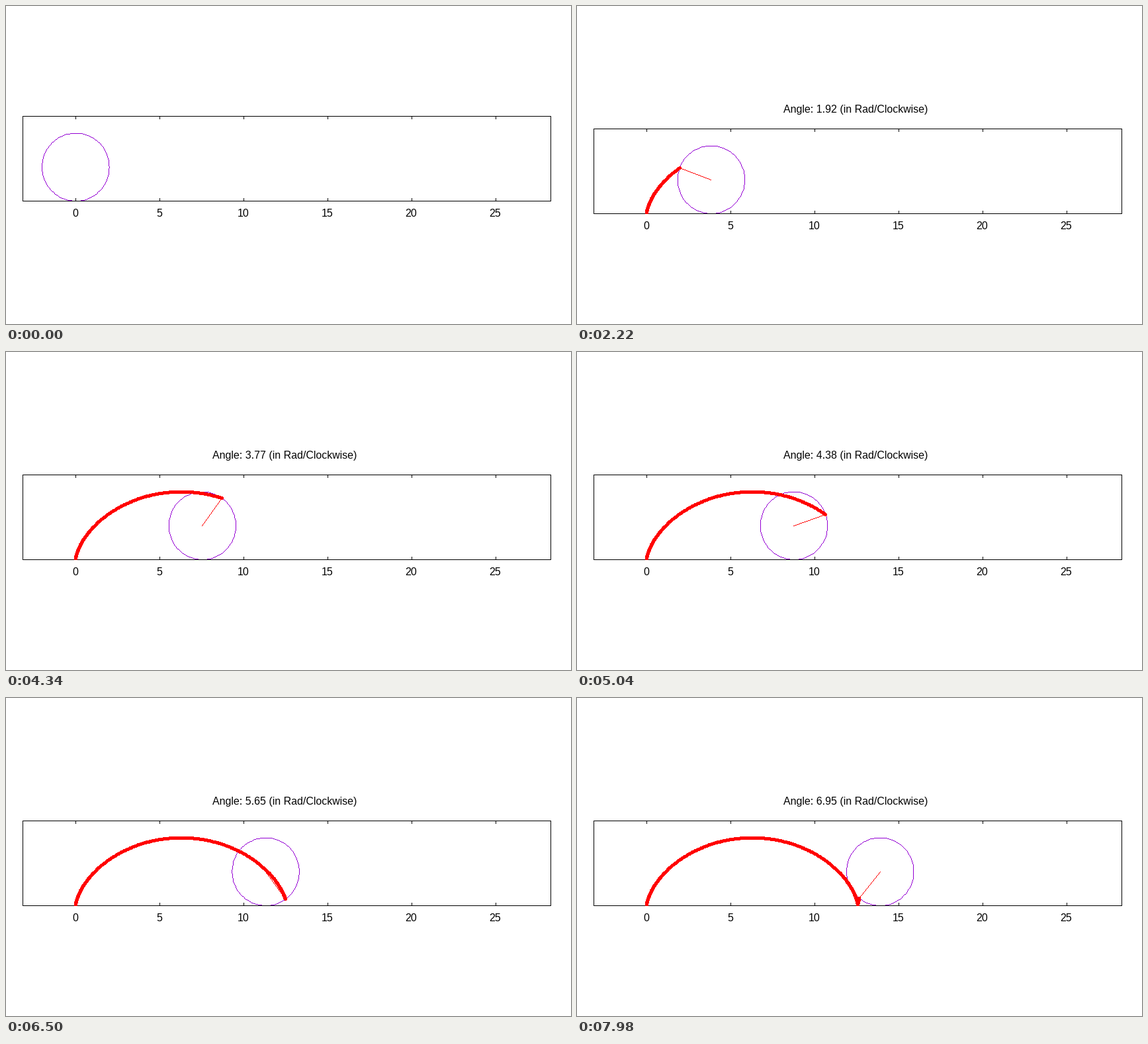
A matplotlib script that plays this animation: 854 px wide and 480 px high, repeating every 8 s.

```python
import numpy as np
import matplotlib.pyplot as plt
from matplotlib.animation import FuncAnimation
from matplotlib.patches import PathPatch, Rectangle
from matplotlib.path import Path

W, H, DPI = 854, 480, 64
PX = 72 / DPI                       # one pixel in points
FRAMES, STEP_MS = 400, 20

LEFT, RIGHT, TOP, BOTTOM = 25, 823, 185, 313
SX = (RIGHT - LEFT) / (10 * np.pi)  # x runs from -pi to 9 pi
SY = (BOTTOM - TOP) / 5             # y runs from 0 to 5
R = 2
TITLE_SHIFT = 19                    # the plot sits higher without a title

plt.rcParams["font.family"] = "Liberation Sans"
plt.rcParams["text.hinting"] = "default"

# Pen outlines, relative to the top left corner of their pixel
DOT = np.array([(0, 0), (1, 0), (1, 1), (0, 1)])
DISC = np.array([(-1, -2), (2, -2), (2, -1), (3, -1), (3, 2), (2, 2),
                 (2, 3), (-1, 3), (-1, 2), (-2, 2), (-2, -1), (-1, -1)])


def to_px(x, y):
    """Plot units to whole pixels, as an array of (column, row)."""
    col = LEFT + (np.asarray(x) + np.pi) * SX
    row = BOTTOM - np.asarray(y) * SY
    return np.round(np.column_stack([col, row]))


def raster(points):
    """Pixels along a polyline, one per step of the longer axis."""
    points = np.asarray(points)
    runs = [points[:1]]
    for a, b in zip(points[:-1], points[1:]):
        steps = int(np.abs(b - a).max())
        if steps:
            part = np.arange(1, steps + 1)[:, None] / steps
            runs.append(np.floor(a + (b - a) * part + 0.5))
    return np.concatenate(runs)


def stamp(pen, pixels):
    """One path holding the pen outline at each pixel."""
    corners = np.vstack([pen, pen[:1]])
    verts = (pixels[:, None, :] + corners[None]).reshape(-1, 2)
    codes = [Path.MOVETO] + [Path.LINETO] * (len(pen) - 1) + [Path.CLOSEPOLY]
    return Path(verts, np.tile(codes, len(pixels)))


def cycloid(a):
    return R * (a - np.sin(a)), R * (1 - np.cos(a))


fig = plt.figure(figsize=(W / DPI, H / DPI), dpi=DPI, facecolor="white")
ax = fig.add_axes([0, 0, 1, 1])
ax.axis("off")
ax.set_xlim(0, W)
ax.set_ylim(H, 0)


def ink(color, z, path=Path(np.empty((0, 2)))):
    patch = PathPatch(path, facecolor=color, lw=0, edgecolor="none",
                      antialiased=False, snap=False, zorder=z)
    return ax.add_artist(patch)


def stroke(points, color, z):
    return ink(color, z, stamp(DOT, raster(points)))


def label(x, y, text):
    return ax.text(x, y, text, size=16 * PX, ha="center", va="baseline",
                   color="black")


# Frame and ticks
stroke([(LEFT, TOP), (RIGHT, TOP), (RIGHT, BOTTOM), (LEFT, BOTTOM),
        (LEFT, TOP)], "black", 2)
for value in range(0, 26, 5):
    col = to_px(value, 0)[0, 0]
    stroke([(col, TOP), (col, TOP + 4)], "black", 2)
    stroke([(col, BOTTOM), (col, BOTTOM - 4)], "black", 2)
    label(col - 0.5, 337, str(value))

title = label(421.5, 161, "")
wheel = ink("#9400d3", 1)
spoke = ink("red", 3)
trace = ink("red", 4)
trace.set_clip_path(Rectangle((LEFT, TOP), RIGHT + 1 - LEFT,
                              BOTTOM + 1 - TOP, transform=ax.transData))

turn = np.linspace(0, 2 * np.pi, 100)


def draw(n):
    started = n > 0
    shift = 0 if started else TITLE_SHIFT
    ax.set_ylim(H + shift, shift)

    a = np.radians(max(n - 1, 0))
    rim = to_px(R * a + R * np.cos(turn), R + R * np.sin(turn))
    wheel.set_path(stamp(DOT, raster(rim)))

    for part in (title, spoke, trace):
        part.set_visible(started)
    if started:
        px, py = cycloid(a)
        spoke.set_path(stamp(DOT, raster(to_px([R * a, px], [R, py]))))
        trail = to_px(*cycloid(np.radians(np.arange(n))))
        trace.set_path(stamp(DISC, trail))
        title.set_text(f"Angle: {a:.2f} (in Rad/Clockwise)")
    return wheel, spoke, trace, title


anim = FuncAnimation(fig, draw, frames=FRAMES, interval=STEP_MS,
                     init_func=lambda: draw(0), repeat=True, repeat_delay=0,
                     blit=False)
plt.show()
```
